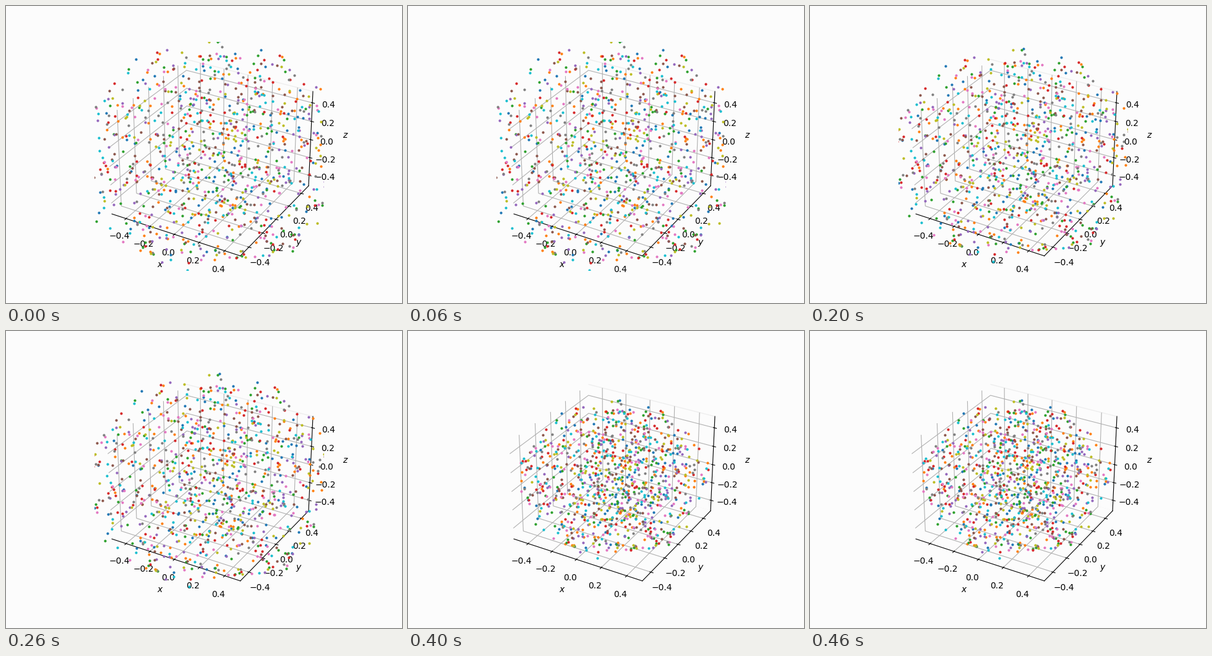
Recreate the animation shown at these times as a matplotlib script. Size 640 px wide and 480 px high, loop 500 ms.

```python
import numpy as np
import matplotlib.pyplot as plt
from matplotlib.animation import FuncAnimation

FRAMES, INTERVAL = 5, 100
COUNT, COLOURS = 1000, 10
STEP = 0.189           # time per frame, in units of the ball's free fall
BG = '#fcfcfc'


def uniform_ball(rng, n):
    """Random points spread evenly through the unit ball."""
    p = rng.normal(size=(n, 3))
    p /= np.linalg.norm(p, axis=1, keepdims=True)
    return p * np.cbrt(rng.uniform(size=(n, 1)))


def radius(frame):
    """Radius of a uniform ball collapsing from rest under its own gravity."""
    t = STEP * frame
    return 1 - t**2 / 2 - t**4 / 12


start = uniform_ball(np.random.default_rng(4), COUNT)

fig = plt.figure(figsize=(6.4, 4.8), dpi=100, facecolor=BG)
ax = fig.add_subplot(projection='3d', facecolor=BG)
for axis in (ax.xaxis, ax.yaxis, ax.zaxis):
    axis.set_pane_color(BG)
ax.yaxis.pane.set_edgecolor('#eeeeee')

lim = 0.5 * 25 / 24    # half a unit plus a thin margin
ax.set(xlim=(-lim, lim), ylim=(-lim, lim), zlim=(-lim, lim),
       xlabel='$x$', ylabel='$y$', zlabel='$z$')

dots = [ax.plot([], [], [], 'o', ms=2, color=f'C{c}')[0]
        for c in range(COLOURS)]


def update(frame):
    pos = start * radius(frame)
    for c, line in enumerate(dots):
        line.set_data_3d(*pos[c::COLOURS].T)
    return dots


anim = FuncAnimation(fig, update, frames=FRAMES, interval=INTERVAL,
                     repeat=True, repeat_delay=0, blit=False)
plt.show()
```
